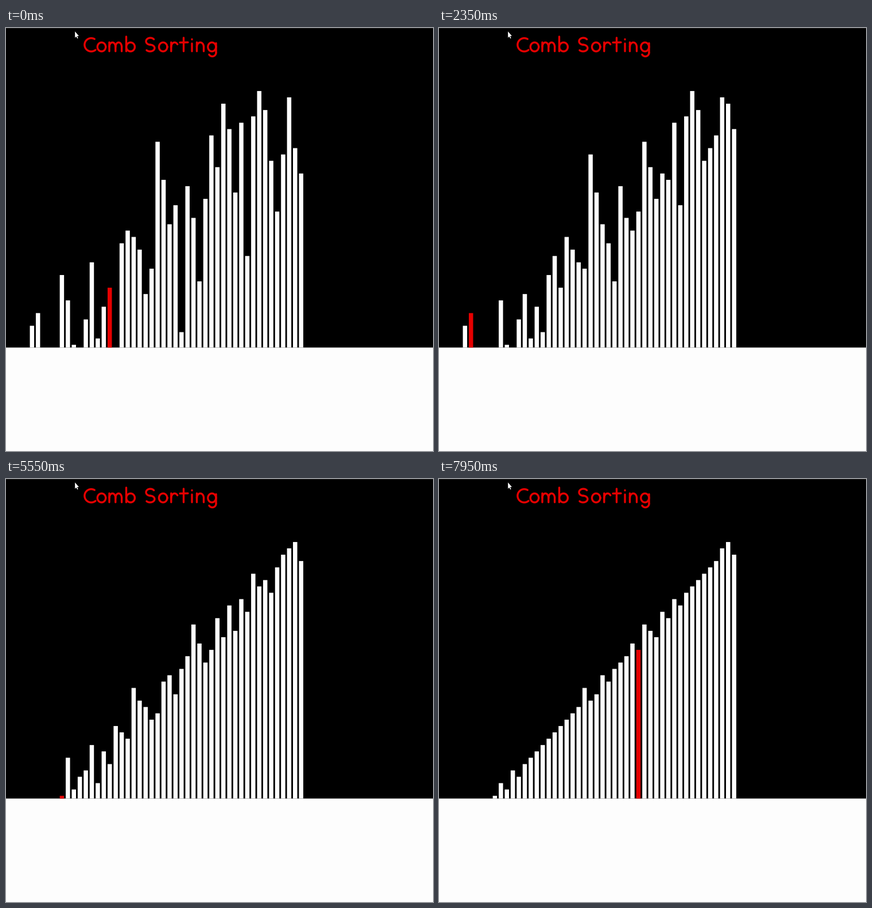
These frames come from a looping animation (744 px wide and 738 px high, 8 s). A matplotlib script:

```python
import numpy as np
import matplotlib.pyplot as plt
from matplotlib.animation import FuncAnimation
from matplotlib.patches import Polygon, Rectangle

WIDTH, HEIGHT, DPI = 744, 738, 100
FRAMES, INTERVAL = 160, 50
FLOOR = 557.5
RED, WHITE, PAGE = "#e60000", "#ffffff", "#fdfdfd"

# The shuffled ranks to sort; a zero ends below the floor.
RANKS = [0] * 4 + [
    4, 6, 0, 0, 0, 12, 8, 1, 0, 5, 14, 2, 7, 10, 0, 17, 19, 18, 16, 9, 13, 33, 27,
    20, 23, 3, 26, 21, 11, 24, 34, 29, 39, 35, 25, 36, 15, 37, 41, 38, 30, 22, 31,
    40, 32, 28]
FIRST_GAP, FIRST_INDEX = 12, 17
HOLD, STEP_TIME, LAG = 350, 33.95, 2.1


def comb_sort_states(values, gap, index):
    """Yield the bars and the marked index before every comparison."""
    values = list(values)
    while True:
        while index + gap < len(values):
            yield list(values), index
            low, high = sorted((values[index], values[index + gap]))
            values[index], values[index + gap] = low, high
            index += 1
        if gap == 1:
            return
        gap, index = int(gap / 1.3), 0


STATES = list(comb_sort_states(RANKS, FIRST_GAP, FIRST_INDEX))

fig = plt.figure(figsize=(WIDTH / DPI, HEIGHT / DPI), dpi=DPI, facecolor="black")
ax = fig.add_axes([0, 0, 1, 1])
ax.set_xlim(0, WIDTH)
ax.set_ylim(HEIGHT, 0)
ax.axis("off")


def box(x, y, width, height, color):
    return ax.add_patch(
        Rectangle((x, y), width, height, fc=color, lw=0, snap=False))


# Title lettering: round-ended lines and elliptic arcs.
BASE, MID, ROUND = 40.6, 33, 7.8


def stroke(x, y):
    ax.plot(x, y, color=RED, lw=3.4 * 72 / DPI, solid_capstyle="round", snap=False)


def stem(x, top=25, bottom=BASE):
    stroke([x, x], [top, bottom])


def arc(x, y, rx, ry, start=0, end=360):
    a = np.radians(np.linspace(start, end, 40))
    stroke(x + rx * np.cos(a), y + ry * np.sin(a))


def arch(x, width):
    arc(x + width / 2, MID, width / 2, ROUND, 180, 360)
    stem(x + width, MID)


def draw_title():
    arc(148.5, 29.3, 11.6, 11.6, -60, -310)         # C
    arc(166.5, MID, 7.2, ROUND)                     # o
    stem(180)                                       # m
    arch(180, 10.8)
    arch(190.8, 10.8)
    stem(209.5, 15)                                 # b
    arc(217, MID, 7.4, ROUND)
    arc(251.5, 23.2, 7.5, 6, -35, -270)             # S
    arc(251, 35, 7.9, 5.8, -90, 140)
    arc(273.7, MID, 7.2, ROUND)                     # o
    stem(287.8)                                     # r
    arc(293.8, MID, 6, ROUND, 180, 325)
    stem(309.5, 17)                                 # t
    stroke([303, 317], [25.3, 25])
    stem(324, 27)                                   # i
    stem(324, 19.6, 20)
    stem(332.5)                                     # n
    arch(332.5, 12)
    arc(358.8, MID, 7, ROUND)                       # g
    stem(366, 26.5, 43)
    arc(359.5, 43, 6.5, 6.5, 0, 150)


def draw_cursor():
    outline = [(120.2, 6), (120.2, 17), (122.5, 14.8), (124.2, 18.4),
               (125.6, 17.8), (123.9, 14.2), (127, 14)]
    ax.add_patch(Polygon(outline, closed=True, fc=WHITE, lw=0))


box(0, FLOOR, WIDTH, HEIGHT - FLOOR, PAGE)
box(0, 0, WIDTH, 1, "#1c1c1c")
draw_title()
draw_cursor()
bars = [box(41.55 + 10.42 * (i - 4), FLOOR, 7.5, 0, WHITE)
        for i in range(len(RANKS))]


def update(frame):
    time = frame * INTERVAL
    step = 0 if time < HOLD else int(time / STEP_TIME - LAG)
    values, marked = STATES[step]
    for i, (bar, value) in enumerate(zip(bars, values)):
        top = 563.8 - 11.07 * value if value else FLOOR
        bar.set_y(top)
        bar.set_height(FLOOR - top)
        bar.set_facecolor(RED if i == marked else WHITE)
    return bars


animation = FuncAnimation(fig, update, frames=FRAMES, interval=INTERVAL,
                          repeat=True, repeat_delay=0, blit=False)
plt.show()
```
